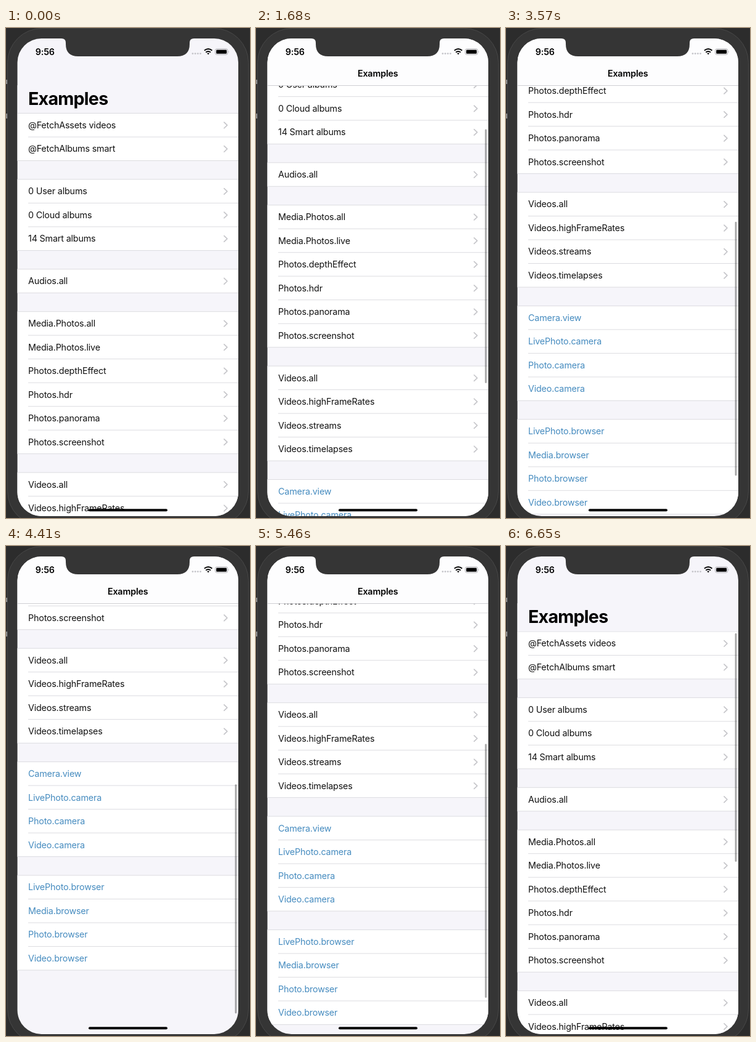
Animation of 396x796 px, one loop 6720 ms. Source, as an HTML page:

```html
<!DOCTYPE html>
<html lang="en">
<head>
<meta charset="utf-8">
<title>Examples</title>
<style>
  html, body { margin: 0; width: 100%; height: 100%; overflow: hidden; background: #2c2c2c; }
  svg { display: block; width: 396px; height: 796px; }
  text { font-family: Inter, Roboto, sans-serif; font-size: 14.3px; letter-spacing: -.16px; fill: #111; }
  .link { fill: #458bbf; }
  .strong { font-weight: 600; fill: #000; }
  .large { font-size: 28.6px; font-weight: 700; letter-spacing: -.75px; fill: #000; }
  .line { stroke: #dcdce0; stroke-width: 1; }
  .chevron { fill: none; stroke: #c6c6ca; stroke-width: 1.7; stroke-linecap: round; stroke-linejoin: round; }
</style>
</head>
<body>
<svg viewBox="0 0 396 796">
  <defs>
    <clipPath id="screen"><rect x="18.5" y="17" width="358.5" height="776" rx="39"/></clipPath>
    <clipPath id="belowBar"><rect x="18" y="93" width="360" height="704"/></clipPath>
  </defs>

  <rect width="396" height="796" fill="#2c2c2c"/>
  <path d="M0 84h2v7h-2zM0 139h2v8h-2z" fill="#8c8c8c"/>
  <rect x="2.5" y=".5" width="391" height="808" rx="56" fill="#353535" stroke="#484848"/>

  <g clip-path="url(#screen)">
    <rect x="18" y="17" width="360" height="777" fill="#f6f5fa"/>
    <g clip-path="url(#belowBar)">
      <g id="list"></g>
      <rect id="largeBack" x="18" y="93" width="360" height="0" fill="#f6f5fa"/>
      <text id="largeTitle" class="large" x="36" y="124.6">Examples</text>
    </g>
    <g id="bar">
      <path d="M18 17h360v76h-360z" fill="#fdfdfe"/>
      <path class="line" d="M18 93.5h360" style="stroke:#cfcfd3"/>
    </g>
    <text id="smallTitle" class="strong" x="197.7" y="79.3" text-anchor="middle">Examples</text>
    <rect id="scroller" x="371.6" width="2.8" rx="1.4" fill="#000" fill-opacity=".35"/>

    <text class="strong" x="47.8" y="43.6">9:56</text>
    <g fill="#c3c3c8" id="dots"></g>
    <g fill="none" stroke="#000" stroke-width="1.9">
      <path d="M321.9 36.6q6.3-5 12.6 0M324.3 39.5q3.9-3 7.8 0"/>
      <path d="M326.3 41.2q1.9-1.3 3.8 0l-1.9 2.1z" fill="#000" stroke="none"/>
    </g>
    <rect x="339.6" y="33.9" width="20.2" height="9.4" rx="2.6" fill="none" stroke="#a9a9ad" stroke-width=".9"/>
    <rect x="341.2" y="35.4" width="17" height="6.4" rx="1.4"/>
    <path d="M361 37q1.4 1.6 0 3.2z" fill="#a9a9ad"/>
    <rect x="134" y="781.3" width="128" height="4" rx="2"/>
  </g>
  <path d="M90 16v1q7 0 7 7v2q0 20 20 20h161q20 0 20-20v-2q0-7 7-7v-1z" fill="#353535"/>
</svg>

<script>
const LOOP = 6720, STEP = 70;
const ROW = 38.5, GAP = 30.4, LIST_TOP = 138.5;
const COLLAPSE = 45, END = 516, PEAK = 556, TOP_HIT = 5894;

const sections = [
  "@FetchAssets videos|@FetchAlbums smart",
  "0 User albums|0 Cloud albums|14 Smart albums",
  "Audios.all",
  "Media.Photos.all|Media.Photos.live|Photos.depthEffect|Photos.hdr|Photos.panorama|Photos.screenshot",
  "Videos.all|Videos.highFrameRates|Videos.streams|Videos.timelapses",
  "Camera.view|LivePhoto.camera|Photo.camera|Video.camera",
  "LivePhoto.browser|Media.browser|Photo.browser|Video.browser"
].map(names => names.split("|"));

const $ = id => document.getElementById(id);
const clamp = x => Math.min(1, Math.max(0, x));
const progress = (t, from, to) => clamp((t - from) / (to - from));
const smooth = u => u * u * (3 - 2 * u);
const line = (x, y) => `<path class="line" d="M${x} ${y}H378"/>`;

function buildList() {
  let y = LIST_TOP, out = "";
  sections.forEach((names, index) => {
    const isLink = index > 4;
    const height = names.length * ROW;
    out += `<rect x="18" y="${y}" width="360" height="${height}" fill="#fff"/>`;
    names.forEach((name, i) => {
      const mid = y + (i + .5) * ROW;
      out += line(i ? 36 : 18, y + i * ROW);
      out += `<text class="${isLink ? "link" : ""}" x="36" y="${mid + 5.2}">${name}</text>`;
      if (!isLink) out += `<path class="chevron" d="M354 ${mid - 4.6}l5 4.8-5 4.8"/>`;
    });
    y += height;
    out += line(18, y);
    y += GAP;
  });
  $("list").innerHTML = out;
}

// Scroll offset: three drags, a bounce at the end, a flick back and a bounce at the top.
function offsetAt(t) {
  if (t < 3920) {
    return 173 * smooth(progress(t, 700, 1500))
      + 135.6 * smooth(progress(t, 1960, 2540))
      + 147 * smooth(progress(t, 3010, 3590));
  }
  if (t < 4420) return 455.6 + (PEAK - 455.6) * smooth(progress(t, 3920, 4420));
  if (t < 5320) {
    const x = (t - 4420) * .0082;
    return END + (PEAK - END) * (1 + x) * Math.exp(-x);
  }
  if (t < TOP_HIT) {
    const u = progress(t, 5320, TOP_HIT), endSlope = 1.23;
    return END * (1 - u * u * (3 - endSlope) - u * u * u * (endSlope - 2));
  }
  const since = t - TOP_HIT;
  return -1.1 * since * Math.exp(-since * .0098);
}

function drawScroller(t, s) {
  let top, bottom;
  if (s < COLLAPSE) {
    top = 141.3 - s;
    bottom = 513 - Math.max(0, s) * .093;
  } else {
    const over = Math.max(0, s - END);
    top = 72.3 + .533 * (s - over) + over;
    bottom = Math.min(759.5, 72.3 + .533 * s + 412.5);
  }
  const bar = $("scroller");
  bar.setAttribute("y", top);
  bar.setAttribute("height", bottom - top);
  bar.setAttribute("opacity", t >= 770 ? 1 : 0);
}

function draw(time) {
  const t = Math.floor(time % LOOP / STEP) * STEP;
  const s = offsetAt(t);
  const returning = t > 4000;
  const collapsed = returning ? 1 - progress(t, TOP_HIT, TOP_HIT + 140) : clamp(s / COLLAPSE);
  const small = returning ? collapsed : progress(s, 36, 48);
  const showLarge = returning ? 1 - collapsed : +(s < COLLAPSE + 10);

  $("list").setAttribute("transform", `translate(0 ${-s})`);
  $("largeTitle").setAttribute("transform", `translate(0 ${-s})`);
  $("largeTitle").setAttribute("opacity", showLarge);
  $("largeBack").setAttribute("height", Math.max(0, LIST_TOP - .5 - s - 93));
  $("bar").setAttribute("opacity", collapsed);
  $("smallTitle").setAttribute("opacity", small);
  drawScroller(t, s);
}

buildList();
$("dots").innerHTML = [0, 1, 2, 3].map(i => `<circle cx="${303 + i * 4.2}" cy="41.6" r="1.4"/>`).join("");

const start = performance.now();
function tick() {
  draw(performance.now() - start);
  requestAnimationFrame(tick);
}
tick();
</script>
</body>
</html>
```
